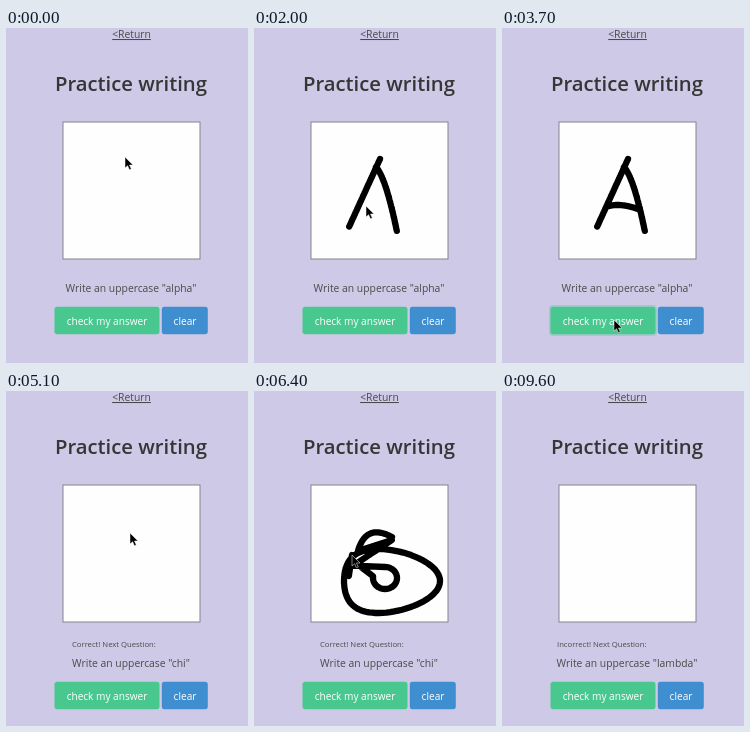
An HTML page for the animation above (9700 ms loop, 242 px wide and 335 px high).

```html
<!DOCTYPE html>
<html lang="en">
<head>
<meta charset="utf-8">
<title>Practice writing</title>
<style>
  html, body { margin: 0; width: 100%; height: 100%; overflow: hidden; background: #cdc9e6; }
  svg { display: block; width: 242px; height: 335px; }
  text { font: 10.35px "Open Sans", "Noto Sans", sans-serif; fill: #4a4a4a; }
  .middle { text-anchor: middle; }
  .title { font-size: 20.3px; font-weight: 600; fill: #363636; }
  .note { font-size: 7.7px; }
  .button text { font-size: 10.1px; fill: #fff; }
  #ink { fill: none; stroke: #000; stroke-width: 6.3; stroke-linecap: round; stroke-linejoin: round; }
</style>
</head>
<body>
<svg viewBox="0 0 242 335">
  <text class="middle" x="125.5" y="10" text-decoration="underline">&lt;Return</text>
  <text class="middle title" x="125" y="62.5">Practice writing</text>
  <rect x="57" y="94" width="137" height="137" fill="#fefefe" stroke="#85838f"/>
  <path id="ink"/>
  <text id="note" class="note" y="255.5"></text>
  <text id="task" class="middle" x="125"></text>
  <g id="buttons" class="button">
    <rect id="ring" x="47" y="277" width="108" height="31" rx="4" fill="#48c78e" opacity=".3"/>
    <rect x="48.5" y="278.7" width="105" height="27.6" rx="2.7" fill="#48c78e"/>
    <text class="middle" x="101" y="296.5">check my answer</text>
    <rect x="155.8" y="278.7" width="46" height="27.6" rx="2.7" fill="#3e8ed0"/>
    <text class="middle" x="179" y="296.5">clear</text>
  </g>
  <path id="cursor" d="M0 0V11L2.6 8.7 4.4 12.8 6.3 12 4.5 8H8Z" stroke="#fff" stroke-width=".5"/>
</svg>
<script>
const LOOP = 9700, STEP = 100;
const CORRECT = 4100, INCORRECT = 9500, CURSOR_GONE = 8600;
const $ = id => document.getElementById(id);
const mix = (a, b, u) => a + (b - a) * u;

const legs = [];
let here = [119, 129];

function add(start, end, pen, at) {
  legs.push({ start, end, pen, at });
  here = at(1);
}

// Quadratic curve from the current place; straight without a bend point.
function glide(start, end, to, bend, pen = false) {
  const from = here;
  const mid = bend || from.map((v, i) => mix(v, to[i], .5));
  add(start, end, pen, u => from.map((v, i) => mix(mix(v, mid[i], u), mix(mid[i], to[i], u), u)));
}
const stroke = (start, end, to, bend) => glide(start, end, to, bend, true);

// Inked oval between two angles in turns; it can drift, shrink or lean into an egg.
function oval(start, end, [x, y, rx, ry], [from, to], { drift = [0, 0], shrink = 1, lean = 0 } = {}) {
  add(start, end, true, u => {
    const angle = mix(from, to, u) * 2 * Math.PI, size = mix(1, shrink, u);
    const c = Math.cos(angle), s = Math.sin(angle);
    return [x + drift[0] * u + rx * size * c - lean * s * s, y + drift[1] * u + ry * size * s];
  });
}

// Letter A
glide(0, 200, [121, 134]);
glide(400, 500, [126, 131]);
stroke(500, 1200, [95, 199]);
glide(1200, 1400, [122, 139]);
stroke(1400, 1900, [143, 204], [132, 150]);
glide(1900, 2000, [112, 178]);
glide(2000, 2100, [107, 178]);
stroke(2100, 2500, [136, 181], [119, 175]);
glide(2500, 3000, [120, 214]);
glide(3000, 3300, [112, 292]);

// Scribble
glide(4400, 5100, [124, 142]);
glide(5100, 5400, [138, 146]);
stroke(5400, 5530, [104, 160], [112, 132]);
stroke(5530, 5640, [138, 149]);
stroke(5640, 5740, [97, 176]);
oval(5740, 5900, [131, 187, 12, 11], [-.25, .55]);
oval(5900, 6350, [138, 190, 48, 32], [.62, -.43], { lean: 14 });
stroke(6350, 6400, [96, 186], [90, 180]);
oval(6400, 7000, [135, 164, 37, 21], [.5, 2.9], { drift: [-13, 21], shrink: .5 });
glide(7000, 7400, [100, 302]);
glide(7600, 8000, [39, 331]);

const legAt = t => legs.findLast(l => l.start <= t);
function place(t) {
  const l = legAt(t);
  return l.at(Math.min(1, (t - l.start) / (l.end - l.start)));
}

function inkPath(since, t) {
  let path = '', wasDown = false;
  for (let s = since; s <= t; s += 5) {
    const l = legAt(s), down = l.pen && s <= l.end;
    if (down) path += (wasDown ? 'L' : 'M') + place(s).map(v => v.toFixed(1));
    wasDown = down;
  }
  return path;
}

const screens = [
  { since: 0, letter: 'alpha', note: '', noteX: 0, shift: 0 },
  { since: CORRECT, letter: 'chi', note: 'Correct! Next Question:', noteX: 66, shift: 12 },
  { since: INCORRECT, letter: 'lambda', note: 'Incorrect! Next Question:', noteX: 55, shift: 12 },
];

function draw(t) {
  const screen = screens.findLast(s => s.since <= t);
  const focused = (t >= 3400 && t < CORRECT) || (t >= 7500 && t < 9400);

  $('ink').setAttribute('d', inkPath(screen.since, t));
  $('cursor').setAttribute('transform', `translate(${place(t)})`);
  $('cursor').style.display = t < CURSOR_GONE ? '' : 'none';
  $('task').textContent = `Write an uppercase "${screen.letter}"`;
  $('task').setAttribute('y', 264 + screen.shift);
  $('note').textContent = screen.note;
  $('note').setAttribute('x', screen.noteX);
  $('buttons').setAttribute('transform', `translate(0 ${screen.shift})`);
  $('ring').style.display = focused ? '' : 'none';
}

function tick() {
  draw(Math.floor(performance.now() % LOOP / STEP) * STEP);
  requestAnimationFrame(tick);
}
tick();
</script>
</body>
</html>
```
